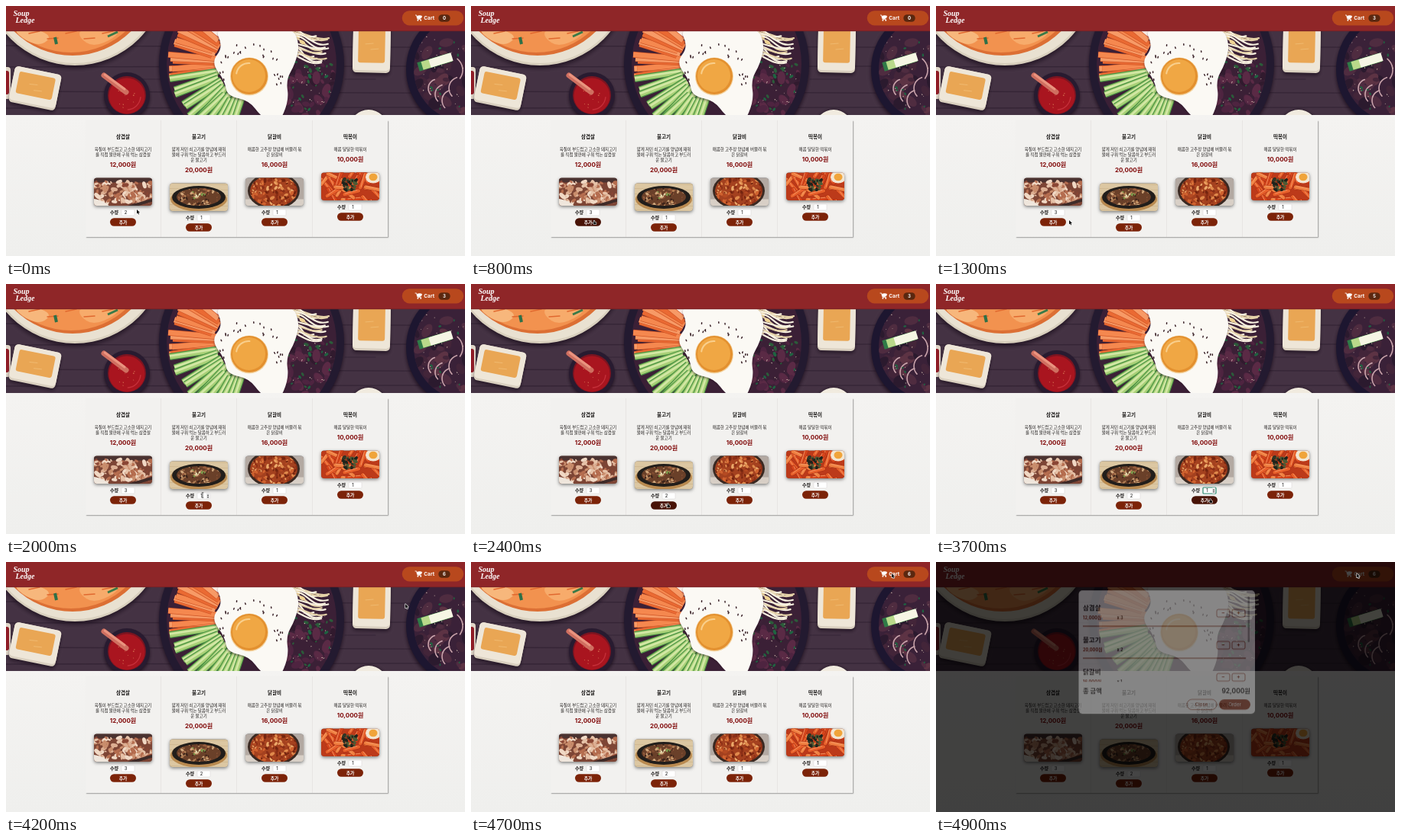
These frames come from a looping animation (600x328 px, 5000 ms). An HTML page with a canvas:

```html
<!DOCTYPE html>
<html lang="ko">
<head>
<meta charset="utf-8">
<title>Menu</title>
<style>
html, body { margin: 0; width: 100%; height: 100%; overflow: hidden; background: #f1f0ee; }
canvas { display: block; width: 100vw; height: 100vh; }
</style>
</head>
<body>
<canvas id="stage"></canvas>
<script>
const W = 600, H = 328, LOOP = 5000, STEP = 100;
const KO = '"Noto Sans CJK KR", "Noto Sans CJK", sans-serif';
const MIXED = 'Inter, "Noto Sans CJK KR", "Noto Sans CJK", sans-serif';
const LATIN = 'Inter, sans-serif';
const scale = window.devicePixelRatio || 1;

const dishes = [
  { name: '삼겹살', price: '12,000원', text: ['육질이 부드럽고 고소한 돼지고기', '를 직접 불판에 구워 먹는 삼겹살'], photo: pork },
  { name: '불고기', price: '20,000원', text: ['얇게 저민 쇠고기를 양념에 재워', '불에 구워 먹는 달콤하고 부드러', '운 불고기'], photo: beef },
  { name: '닭갈비', price: '16,000원', text: ['매콤한 고추장 양념에 버물려 볶', '은 닭갈비'], photo: chicken },
  { name: '떡볶이', price: '10,000원', text: ['매콤 달달한 떡볶이'], photo: riceCake }
];

// time, x, y of the pointer tip
const pointerPath = [
  [0, 171, 267], [200, 167, 268], [600, 161, 281], [1000, 160, 282], [1300, 174, 281],
  [1700, 236, 283], [2000, 257, 277], [2200, 264, 276], [2400, 257, 288], [2700, 258, 288],
  [2900, 336, 281], [3200, 363, 270], [3500, 363, 271], [3700, 358, 282], [3800, 358, 282],
  [4200, 522, 55], [4500, 550, 15], [5000, 550, 15]
];
const bumps = [980, 2680, 3720];

function layer(el = document.createElement('canvas')) {
  el.width = W * scale;
  el.height = H * scale;
  const ctx = el.getContext('2d');
  ctx.scale(scale, scale);
  return ctx;
}
function paint(ctx, draw) {
  const old = g;
  g = ctx;
  draw();
  g = old;
}
function rng(seed) {
  return () => (seed = (seed * 16807) % 2147483647) / 2147483647;
}
function ellipse(x, y, rx, ry, fill, turn = 0) {
  g.beginPath();
  g.ellipse(x, y, rx, ry, turn, 0, Math.PI * 2);
  g.fillStyle = fill;
  g.fill();
}
const circle = (x, y, r, fill) => ellipse(x, y, r, r, fill);
function rect(x, y, w, h, fill) {
  g.fillStyle = fill;
  g.fillRect(x, y, w, h);
}
function round(x, y, w, h, r, fill, stroke, width = 0.6) {
  g.beginPath();
  g.roundRect(x, y, w, h, r);
  if (fill) { g.fillStyle = fill; g.fill(); }
  if (stroke) { g.strokeStyle = stroke; g.lineWidth = width; g.stroke(); }
}
function line(x1, y1, x2, y2, color, width, cap = 'round') {
  g.beginPath();
  g.moveTo(x1, y1);
  g.lineTo(x2, y2);
  g.strokeStyle = color;
  g.lineWidth = width;
  g.lineCap = cap;
  g.stroke();
}
function arc(x, y, r, a, b, color, width) {
  g.beginPath();
  g.arc(x, y, r, a, b);
  g.strokeStyle = color;
  g.lineWidth = width;
  g.lineCap = 'round';
  g.stroke();
}
function blob(points, fill) {
  const n = points.length;
  const mid = i => {
    const p = points[i % n], q = points[(i + 1) % n];
    return [(p[0] + q[0]) / 2, (p[1] + q[1]) / 2];
  };
  g.beginPath();
  g.moveTo(...mid(0));
  for (let i = 1; i <= n; i++) g.quadraticCurveTo(...points[i % n], ...mid(i));
  g.fillStyle = fill;
  g.fill();
}
function text(s, x, y, size, color, { weight = 400, align = 'center', font = KO } = {}) {
  g.font = `${weight} ${size}px ${font}`;
  g.textAlign = align;
  g.textBaseline = 'alphabetic';
  g.fillStyle = color;
  g.fillText(s, x, y);
}
function clipped(shape, draw) {
  g.save();
  g.beginPath();
  shape();
  g.clip();
  draw();
  g.restore();
}
function shaded(color, blur, dy, draw, dx = 0) {
  g.save();
  g.shadowColor = color;
  g.shadowBlur = blur * scale;
  g.shadowOffsetX = dx * scale;
  g.shadowOffsetY = dy * scale;
  draw();
  g.restore();
}
function scatter(seed, count, x, y, w, h, colors, min, max, flat = 0.6) {
  const r = rng(seed);
  for (let i = 0; i < count; i++) {
    const size = min + r() * (max - min);
    ellipse(x + r() * w, y + r() * h, size, size * flat, colors[Math.floor(r() * colors.length)], r() * 3);
  }
}

function tray(x, y, w, h, turn) {
  g.save();
  g.translate(x, y);
  g.rotate(turn);
  shaded('rgba(20,8,22,.6)', 4, 3, () => round(-w / 2, -h / 2, w, h, 5, '#d9cfbf'));
  round(-w / 2, -h / 2, w, h - 3, 5, '#eee6d8');
  round(-w / 2 + 7, -h / 2 + 6, w - 14, h - 19, 3, '#e9a654');
  line(-8, -4, 2, -5, '#f1bd76', 0.8);
  line(-1, 3, 9, 2, '#f1bd76', 0.8);
  g.restore();
}

function soupPlate() {
  shaded('rgba(20,8,22,.6)', 5, 4, () => circle(90, -40, 118, '#d8cfbd'));
  circle(90, -41, 116, '#e9e1d1');
  circle(87, -43, 108, '#dc6f34');
  circle(85, -44, 105, '#f2924f');
  blob([[8, 30], [40, 30], [60, 40], [46, 52], [26, 46]], '#f7b77c');
  blob([[96, 30], [150, 30], [142, 42], [114, 54], [96, 42]], '#f7ab6b');
  for (let i = 0; i < 5; i++) line(30 + i * 24, 36 + (i % 2) * 7, 44 + i * 24, 33 + (i % 2) * 9, '#e0682f', 1.4);
  line(64, 41, 66, 50, '#2f7047', 4, 'butt');
  line(133, 40, 146, 34, '#3a7a48', 3, 'butt');
}

// sticks laid towards the middle of the bowl
function fan(count, from, to, inner, draw) {
  const r = rng(29);
  for (let i = 0; i < count; i++) {
    const a = from + (to - from) * i / (count - 1);
    const near = inner + r() * 10, far = 103 + r() * 7, skew = (r() - 0.5) * 0.1;
    draw(321 + Math.cos(a + skew) * far, 76 + Math.sin(a + skew) * far,
      321 + Math.cos(a) * near, 76 + Math.sin(a) * near, i);
  }
}

function vegetables() {
  const carrots = ['#f5884f', '#ea6a33', '#f79a66'];
  for (let i = 0; i < 4; i++) {
    ellipse(246 + i * 15, 33 + (i % 2) * 3, 12, 8, '#d85a7c', 0.2);
    ellipse(246 + i * 15, 32.5 + (i % 2) * 3, 10.5, 6.8, '#f8ece6', 0.2);
  }
  fan(15, 2.95, 3.75, 44, (x, y, u, v, i) => {
    line(x, y, u, v, '#cf5526', 8, 'butt');
    line(x, y, u, v, carrots[i % 3], 6.6, 'butt');
  });
  fan(13, 2.92, 1.85, 44, (x, y, u, v) => {
    line(x, y, u, v, '#4c9445', 9, 'butt');
    line(x, y, u, v, '#a9d077', 6.6, 'butt');
    line(x, y - 1, u, v - 1, '#d3e8a6', 2.6, 'butt');
  });
}

function sprouts() {
  const r = rng(83);
  for (let i = 0; i < 15; i++) {
    const x = 348 + r() * 26, y = 27 + i * 2.6, u = 400 + r() * 24, v = y + 8 + r() * 10;
    g.beginPath();
    g.moveTo(x, y);
    g.bezierCurveTo(x + 20, y - 5, u - 20, v + 6, u, v);
    g.strokeStyle = i % 3 ? '#f7f0df' : '#e5d2a8';
    g.lineWidth = 2.2;
    g.lineCap = 'round';
    g.stroke();
    if (i % 3 === 0) ellipse(x + 18, y + 5, 4, 2.4, '#efd394', 0.5);
  }
}

function egg() {
  const white = [[272, 28], [325, 22], [374, 28], [384, 50], [378, 76], [366, 97], [370, 124],
    [356, 156], [334, 146], [318, 124], [289, 118], [286, 98], [268, 74], [284, 54]];
  shaded('rgba(40,15,30,.45)', 3, 2, () => blob(white, '#fbf9f4'));
  circle(318, 92.5, 25, '#f3d3a0');
  circle(318, 92, 24, '#e3902f');
  circle(317.5, 91.5, 21.5, '#f0a744');
  arc(317, 91, 16, 3.3, 4.8, '#f9cf8c', 2);
  const r = rng(71);
  for (let i = 0; i < 28; i++) {
    const a = 3 + r() * 3.6, d = 30 + r() * 14, x = 319 + Math.cos(a) * d, y = 91 + Math.sin(a) * d;
    line(x, y, x + r() * 2 - 1, y + 1.5, '#3a2228', 1.5);
  }
}

function mainBowl() {
  shaded('rgba(20,8,22,.8)', 5, 3, () => circle(321, 76, 121, '#231a30'));
  circle(321, 76, 111, '#3b2036');
  clipped(() => g.arc(321, 76, 111, 0, 7), () => {
    scatter(19, 50, 350, 66, 85, 78, ['#4e2440', '#311a2e', '#5a2a45'], 3, 9);
    scatter(43, 24, 362, 68, 66, 74, ['#1f6341', '#2b5c3a'], 1.5, 3.4);
    scatter(5, 30, 365, 66, 65, 77, ['#e7d3c0'], 0.5, 0.9);
    vegetables();
    sprouts();
    egg();
  });
}

function sideBowl() {
  shaded('rgba(20,8,22,.8)', 5, 3, () => circle(602, 83, 79, '#1d1630'));
  circle(602, 83, 69, '#3a2138');
  clipped(() => g.arc(602, 83, 69, 0, 7), () => {
    scatter(91, 40, 535, 33, 70, 110, ['#4f2c40', '#2b1a2e', '#5d3344', '#432539'], 4, 10);
    for (let i = 0; i < 4; i++) arc(564 + i * 10, 108 + (i % 3) * 8, 12 + i, 2.4, 4.4, '#c9a3ab', 1.6);
    arc(578, 84, 19, 5.4, 6.9, '#c9a3ab', 1.6);
    scatter(8, 30, 538, 38, 60, 100, ['#e9d6c0'], 0.5, 0.9);
    scatter(37, 9, 545, 36, 55, 100, ['#1f6341'], 1.4, 2.6);
  });
  line(539, 80, 582, 67, '#2f7a47', 12, 'butt');
  line(544, 78.5, 582, 67, '#b9d98a', 11, 'butt');
  line(554, 75.5, 583, 66.5, '#f6f6e4', 11, 'butt');
}

function hero() {
  clipped(() => g.rect(0, 33, W, 110), () => {
    rect(0, 33, W, 110, '#443243');
    [[52, 0.02], [80, -0.01], [112, 0.02], [134, -0.01]].forEach(([y, k]) =>
      line(0, y, W, y + k * 120, '#352536', 1.3));
    for (let i = 0; i < 5; i++) line(75 + i * 92, 68 + (i % 3) * 28, 115 + i * 92, 68 + (i % 3) * 28, '#352536', 1);
    soupPlate();
    round(-12, 80, 18, 42, 4, '#e0d6c8');
    round(-10, 85, 14, 31, 3, '#8f1c26');
    tray(38, 108, 62, 48, 0.2);
    shaded('rgba(20,8,22,.7)', 4, 3, () => circle(158, 117, 30, '#281b30'));
    circle(158, 117, 25, '#7c1420');
    circle(158, 118, 23.5, '#a9151f');
    arc(158, 118, 18, 0.1, 1.5, '#c5303a', 1.4);
    line(128, 91, 157, 113, '#cf6f60', 7);
    line(129, 90, 155, 109, '#ea947f', 3);
    scatter(3, 10, 147, 111, 22, 23, ['#e08a5e'], 0.5, 0.9);
    tray(478, 54, 49, 67, 0.02);
    shaded('rgba(20,8,22,.7)', 4, 0, () => circle(474, 161, 25, '#f1ebdf'));
    mainBowl();
    sideBowl();
  });
}

function pork(x, y) {
  rect(x, y, 76, 37, '#7d4535');
  rect(x, y, 76, 6, '#4a3230');
  scatter(12, 130, x, y + 5, 76, 28,
    ['#dcae92', '#b56d4f', '#f0d8c4', '#8a4634', '#c98d6c', '#e6c2a8'], 1.5, 5, 0.55);
  blob([[x - 6, y + 26], [x + 12, y + 30], [x + 24, y + 40], [x - 5, y + 43]], '#efe6dc');
  line(x + 46, y + 38, x + 77, y + 29, '#3f2b28', 4);
}
function beef(x, y) {
  rect(x, y, 76, 37, '#dcc7a2');
  for (let i = 0; i < 6; i++) line(x, y + i * 7, x + 76, y + i * 7 + 2, '#cbb28a', 0.7);
  ellipse(x + 38, y + 21, 37, 16, '#b98a50');
  ellipse(x + 38, y + 18.5, 35, 15, '#221e1b');
  ellipse(x + 38, y + 18, 29, 11.5, '#6a4029');
  clipped(() => g.ellipse(x + 38, y + 18, 29, 11.5, 0, 0, 7), () => {
    scatter(33, 110, x + 10, y + 6, 56, 24, ['#93583a', '#3e241a', '#b78356', '#7a4a2f', '#d0a67a'], 0.9, 2.8);
    scatter(51, 9, x + 30, y + 11, 18, 10, ['#79a04c', '#e4dcae'], 1, 2.2);
  });
}
function chicken(x, y) {
  rect(x, y, 76, 37, '#b3a9a2');
  rect(x, y + 28, 76, 9, '#d8cfc6');
  ellipse(x + 37, y + 17, 34, 24, '#3a2922');
  ellipse(x + 37, y + 17, 31, 21, '#a4411f');
  clipped(() => g.ellipse(x + 37, y + 17, 31, 21, 0, 0, 7), () =>
    scatter(61, 150, x + 5, y, 66, 37, ['#d0622f', '#e08a4c', '#8a2e16', '#b54a22', '#eba869', '#74240f'], 1.2, 3.4));
}
function riceCake(x, y) {
  rect(x, y, 76, 37, '#bc3a1a');
  const r = rng(17);
  for (let i = 0; i < 26; i++) {
    const px = x + r() * 72, py = y + r() * 37, a = r() * 2.4 - 1.2;
    const u = px + Math.cos(a) * 19, v = py + Math.sin(a) * 19;
    line(px, py, u, v, '#a62d12', 5.4);
    line(px, py, u, v, ['#e8602b', '#d5451c', '#f07f40'][i % 3], 4.4);
    line(px + 1, py - 1, u - 2, v - 1, '#f6a06c', 0.8);
  }
  scatter(29, 34, x + 28, y + 9, 18, 14, ['#1f241c', '#2f3526', '#4e5a34'], 1.5, 4);
  ellipse(x + 68, y + 6, 10, 8, '#f3e6d2');
  ellipse(x + 68, y + 6, 5.5, 4.8, '#f0a43a');
}

function card(d, i) {
  const cx = 153 + i * 99, top = [226, 233, 226, 219][i];
  text(d.name, cx, 173.7, 6.5, '#181615', { weight: 700 });
  d.text.forEach((s, n) => text(s, cx, 190.4 + n * 7, 5.5, '#221f1e', { weight: 500 }));
  text(d.price, cx, top - 14.8, 8, '#820c0c', { weight: 700, font: MIXED });
  shaded('rgba(0,0,0,.5)', 4, 1.5, () => round(cx - 38, top - 0.5, 76, 36.5, 4, '#777'));
  clipped(() => g.roundRect(cx - 38, top - 0.5, 76, 36.5, 4), () => d.photo(cx - 38, top - 0.5));
  text('수량', cx - 17, top + 46.8, 6.1, '#201d1c', { weight: 700, align: 'left' });
}

function page() {
  const bg = g.createLinearGradient(0, 143, 0, H);
  bg.addColorStop(0, '#f4f3f1');
  bg.addColorStop(1, '#efefed');
  g.fillStyle = bg;
  g.fillRect(0, 0, W, H);
  hero();
  rect(0, 0, W, 33, '#8f2628');
  rect(0, 32.4, W, 0.8, '#752024');
  const logo = { weight: 'italic 700', align: 'left', font: '"Liberation Serif", serif' };
  text('Soup', 9.5, 13.2, 10, '#fff', logo);
  text('Ledge', 12.5, 21.8, 10, '#fff', logo);
  shaded('rgba(0,0,0,.35)', 1.2, 0.7, () => rect(104, 150, 395, 153, '#f2f1ef'), 0.7);
  for (let i = 1; i < 4; i++) rect(103 + i * 99, 150, 0.7, 153, '#e2e0de');
  dishes.forEach(card);
}

function spinner(x, y) {
  round(x - 2, y - 4, 4, 8, 1, '#e6e6e6');
  text('▴', x, y - 0.4, 4, '#333', { font: '"DejaVu Sans", sans-serif' });
  text('▾', x, y + 3.3, 4, '#333', { font: '"DejaVu Sans", sans-serif' });
}

// draws amounts and buttons; returns the pointer shape for what lies under it
function controls(t, p) {
  const amounts = [t < 200 ? 2 : 3, t < 2100 ? 1 : 2, 1, 1];
  let shape = 'arrow';
  amounts.forEach((n, i) => {
    const cx = 153 + i * 99, y = [271, 278, 271, 264][i];
    const over = (dx, dy, w, h) => Math.abs(p.x - cx - dx) < w && Math.abs(p.y - y - dy) < h;
    const focus = i === 2 && t >= 3200 && t < 3800;
    round(cx - 2, y - 4, 17, 8, 1, '#fff', focus ? '#2b8a70' : '#d5d3d1', focus ? 1.2 : 0.5);
    text(n, cx + 3.5, y + 2.1, 5.7, '#222', { weight: 500, font: LATIN });
    if (focus || over(6.5, 0, 8.5, 4)) spinner(cx + 12, y);
    round(cx - 17, y + 7.3, 34, 10.4, 5.2, over(0, 12, 14, 5) ? '#481306' : '#7c2308');
    text('추가', cx, y + 14.6, 5.8, '#fff', { weight: 700 });
    if (over(0, 12, 18, 5)) shape = 'hand';
    if (over(4, 0, 6, 4)) shape = 'beam';
  });
  return shape;
}

function bumpScale(t) {
  const start = bumps.find(b => t >= b && t < b + 200);
  if (start === undefined) return 1;
  const p = (t - start) / 200;
  const keys = [[0, 1], [0.1, 0.9], [0.3, 1.1], [0.5, 1.15], [1, 1]];
  const i = keys.findIndex(k => k[0] > p);
  const [a, v] = keys[i - 1], [b, w] = keys[i];
  return v + (w - v) * (p - a) / (b - a);
}

function cartButton(t) {
  const count = t < 1000 ? 0 : t < 2700 ? 3 : t < 3800 ? 5 : 6;
  const s = bumpScale(t);
  g.save();
  g.translate(558, 15.8);
  g.scale(s, s);
  g.translate(-558, -15.8);
  round(517.7, 6.2, 80.5, 19.2, 9.6, '#b8481d');
  g.beginPath();
  g.moveTo(535, 12);
  g.lineTo(536.6, 12);
  g.lineTo(538, 17.3);
  g.lineTo(542.4, 17.3);
  g.strokeStyle = '#fff';
  g.lineWidth = 0.9;
  g.stroke();
  blob([[536.4, 12.4], [544.5, 12.2], [543, 16.8], [537.2, 17]], '#fff');
  circle(538.4, 18.8, 0.95, '#fff');
  circle(542.2, 18.8, 0.95, '#fff');
  text('Cart', 546.3, 18.2, 6.5, '#fff', { weight: 700, align: 'left', font: LATIN });
  round(565.3, 11.2, 15.4, 9.6, 4.8, '#5a270f');
  text(count, 573, 18.2, 6, '#fff', { weight: 700, font: LATIN });
  g.restore();
}

function modalCard() {
  const left = { weight: 700, align: 'left' };
  round(186.5, 50, 230.5, 162, 5, '#fff');
  clipped(() => g.rect(190, 53, 224, 117), () => {
    [3, 2, 1].forEach((n, i) => {
      const y = 73 + i * 42;
      text(dishes[i].name, 192, y + 2.5, 8.5, '#221c1b', left);
      text(dishes[i].price, 192, y + 15.3, 5.6, '#84220d', { ...left, font: MIXED });
      text('x ' + n, 236.5, y + 15.3, 5.6, '#332522', { ...left, font: LATIN });
      ['−', '+'].forEach((s, k) => {
        round(367 + k * 20, y + 2, 17, 10, 2, null, '#84220d', 0.7);
        text(s, 375.5 + k * 20, y + 9.3, 7, '#84220d', { weight: 700, font: LATIN });
      });
      rect(192, y + 23.5, 213, 1, '#7a1f0b');
    });
    round(407.5, 58, 2.5, 60, 1.2, '#a5a5a5');
  });
  text('총 금액', 192, 184.8, 8.3, '#211b1a', left);
  text('92,000원', 411, 185.2, 8.3, '#211b1a', { weight: 700, align: 'right', font: MIXED });
  round(328, 193, 39, 13.5, 6.7, null, '#8a2b13', 0.7);
  text('Close', 347, 202, 6.2, '#8a2b13', { font: LATIN });
  round(370, 193, 41, 13.5, 6.7, '#8a2b13');
  text('Order', 390.5, 202, 6.2, '#fff', { font: LATIN });
}

function modal(t) {
  if (t < 4900) return;
  rect(0, 0, W, H, 'rgba(0,0,0,.73)');
  const p = Math.min(1, (t - 4840) / 300), ease = 1 - (1 - p) ** 2;
  g.save();
  g.globalAlpha = ease;
  g.drawImage(popup.canvas, 0, -20 * (1 - ease), W, H);
  g.restore();
}

function pointerAt(t) {
  const i = pointerPath.findIndex(k => k[0] > t);
  const [a, x, y] = pointerPath[i - 1], [b, u, v] = pointerPath[i];
  const p = (t - a) / (b - a), e = p * p * (3 - 2 * p);
  return { x: x + (u - x) * e, y: y + (v - y) * e };
}

function pointer({ x, y }, shape) {
  if (shape === 'beam') {
    line(x, y - 3, x, y + 3, '#222', 0.7);
    line(x - 1, y - 3.3, x + 1, y - 3.3, '#222', 0.6);
    line(x - 1, y + 3.3, x + 1, y + 3.3, '#222', 0.6);
    return;
  }
  const outline = shape === 'hand'
    ? [[0, 0], [1.1, 0], [1.1, 2], [3.2, 2.5], [3, 5], [0.2, 5], [-1.5, 2.8], [0, 3]]
    : [[0, 0], [0, 5.5], [1.3, 4.4], [2.2, 6.4], [3.2, 5.9], [2.3, 4], [4, 3.9]];
  g.beginPath();
  outline.forEach(([dx, dy]) => g.lineTo(x + dx, y + dy));
  g.closePath();
  g.lineJoin = 'round';
  g.strokeStyle = '#fff';
  g.lineWidth = 1.1;
  g.stroke();
  g.fillStyle = '#111';
  g.fill();
}

let g = layer(document.getElementById('stage'));
const base = layer(), popup = layer();
paint(base, page);
paint(popup, modalCard);

function draw(t) {
  const p = pointerAt(t);
  g.drawImage(base.canvas, 0, 0, W, H);
  const shape = controls(t, p);
  cartButton(t);
  modal(t);
  pointer(p, shape);
}

const begin = performance.now();
let last = -1;
function tick() {
  const t = Math.floor(((performance.now() - begin) % LOOP) / STEP) * STEP;
  if (t !== last) draw(last = t);
  requestAnimationFrame(tick);
}
tick();
</script>
</body>
</html>
```
